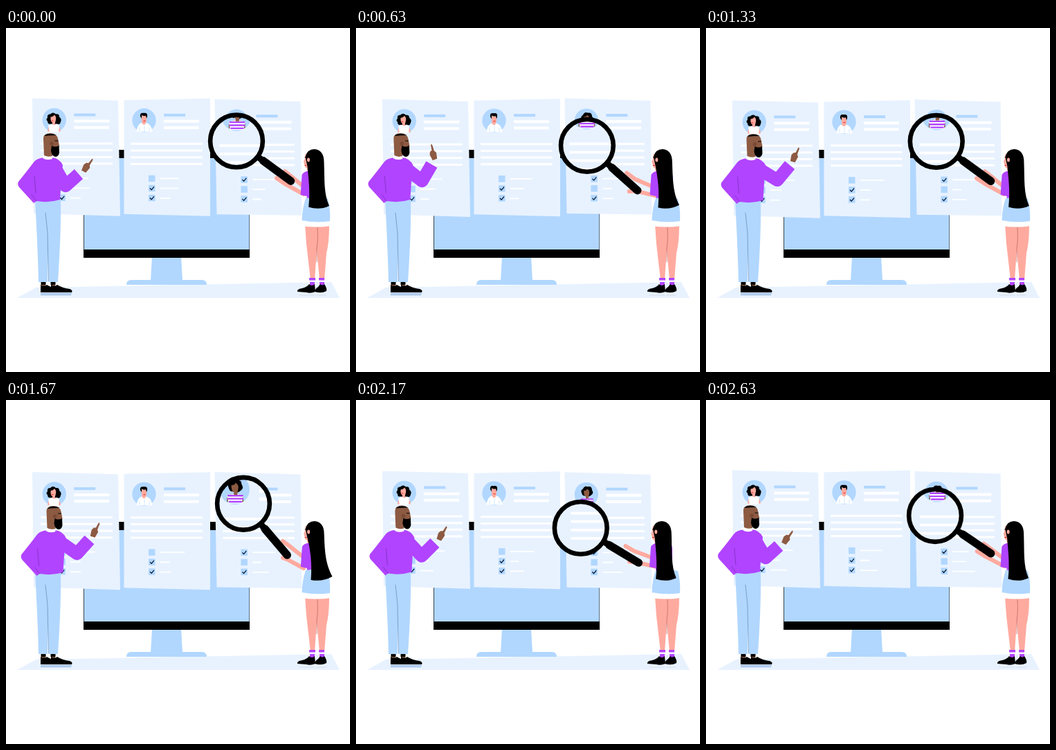
These frames come from a looping animation (497x497 px, 2670 ms). An HTML page without scripts:

```html
<!DOCTYPE html>
<html lang="en">
<head>
<meta charset="utf-8">
<title>Reviewing candidates</title>
<style>
html, body { margin: 0; width: 100%; height: 100%; overflow: hidden; background: #fff; }
svg { display: block; width: 100%; height: 100%; }

.pale { fill: #e8f2ff; }
.blue { fill: #b1d7ff; }
.purple { fill: #b144ff; }
.skin { fill: #ffaa9f; }
.brown { fill: #8d5a42; }
.white { fill: #fff; }
.line { fill: none; stroke-linecap: round; stroke-linejoin: round; }

/* --p is the time (ms) of the positive extreme, --d half a period */
.slow { --d: 1335ms; }
.fast { --d: 667.5ms; }
.sway, .tilt, .row, .hair {
  animation: sway var(--d) cubic-bezier(.364, 0, .636, 1) calc(var(--p) * 1ms - 3 * var(--d)) infinite alternate;
}
.sway { --x: 0px; --y: 0px; }
.tilt { animation-name: tilt; }
.row { animation-name: row; }
.hair { animation-name: hair; }
@keyframes sway {
  from { translate: calc(var(--x) * -1) calc(var(--y) * -1); }
  to { translate: var(--x) var(--y); }
}
@keyframes tilt { from { rotate: 26.3deg; } to { rotate: 49.7deg; } }
@keyframes row { from { width: 13px; } to { width: 36px; } }
@keyframes hair {
  from { d: path("M431 186Q434 175 444 175Q458 176 458 194C459 220 456 240 463 258Q449 264 434 258C437 235 434 216 434 200Z"); }
  to { d: path("M431 186Q434 175 444 175Q458 176 458 194C459 220 460 236 470 255Q456 263 439 260C441 235 438 216 434 200Z"); }
}

.lean, .sleeve, .hand { animation: lean 2670ms ease-in-out infinite; }
.sleeve { animation-name: sleeve; }
.hand { animation-name: hand; }
@keyframes lean {
  0%, 20%, 88%, 100% { translate: 0 0; }
  38%, 75% { translate: 4.5px 1px; }
}
@keyframes sleeve {
  0%, 9%, 100% { d: path("M71 202L86 228L105 211"); }
  23.6% { d: path("M71 202L95 221L109 197"); }
  38.6% { d: path("M71 202L99 217L117 194"); }
  62.5% { d: path("M71 202L98 221L116 201"); }
  73.8% { d: path("M71 202L97 222L116 202"); }
  88.8% { d: path("M71 202L88 228L107 210"); }
}
@keyframes hand {
  0%, 9%, 100% { translate: 114px 205px; rotate: 28deg; }
  23.6% { translate: 113px 187px; rotate: -21deg; }
  38.6% { translate: 122px 186px; rotate: 15deg; }
  62.5% { translate: 122px 194px; rotate: 18deg; }
  73.8% { translate: 122px 195px; rotate: 18deg; }
  88.8% { translate: 116px 203px; rotate: 27deg; }
}

.arms { animation: arms 1335ms linear infinite; }
@keyframes arms {
  0%, 100% { d: path("M403 207L413 215L432 231M391 217L403 225L430 240"); }
  25% { d: path("M400 204L411 212L432 229M400 228L408 231L430 243"); }
  50% { d: path("M390 210L402 219L432 231M394 237L404 236L432 242"); }
  75% { d: path("M389 212L401 217L432 228M396 230L406 233L432 239"); }
}
</style>
</head>
<body>
<svg viewBox="0 0 497 497" xmlns="http://www.w3.org/2000/svg">
<defs>
  <clipPath id="glass"><circle r="36"/></clipPath>
  <g id="tick">
    <rect class="blue" width="9.5" height="9.5"/>
    <path class="line" d="M2.3 5L4.2 7L7.6 2.8" stroke="#0a1a3a" stroke-width="1.3"/>
  </g>
  <rect id="box" class="blue" width="9.5" height="9.5"/>
  <g id="resume">
    <circle class="blue" cx="199.5" cy="134.5" r="17.2"/>
    <path class="blue" d="M228 125h31v4h-31z"/>
    <g class="white">
      <path d="M228 134h51v4h-51zM228 143.3h50.500v4h-50.500z"/>
      <path d="M180 167h103.500v3h-103.500zM180 176.700h103.500v3h-103.500zM180 186.400h103.500v3h-103.500zM180 196.100h103.500v3h-103.500z"/>
      <rect class="row slow" x="222.500" y="217.700" height="1.800" rx=".9" style="--p:calc(660 + var(--o))"/>
      <rect class="row slow" x="222.500" y="232" height="1.800" rx=".9" style="--p:calc(2180 + var(--o))"/>
      <rect class="row slow" x="222.500" y="246.300" height="1.800" rx=".9" style="--p:calc(1650 + var(--o))"/>
    </g>
  </g>
  <g id="shoe">
    <path d="M0 0Q5 3 9 0Q17 5 27 6Q32 8 30 11H0Z"/>
  </g>
</defs>

<path class="pale" d="M16 390L43 375L470 367L482 390Z"/>

<!-- monitor -->
<path class="blue" d="M211 330H253L255 365H209ZM174 371Q174 364 181 364H283Q290 364 290 371Z"/>
<path d="M112 176H352V332H112Z"/>
<path class="blue" d="M112.700 188H351.500V320H112.700Z"/>

<!-- resumes -->
<g class="sway slow" style="--y:1.5px;--p:1340;--o:40">
  <path class="pale" d="M38 103L162 106.300L165 273.200L40 269.500Z"/>
  <g transform="translate(-129.700 0)">
    <use href="#resume"/>
    <use href="#box" x="206" y="214"/><use href="#box" x="206" y="228"/><use href="#tick" x="206" y="242"/>
  </g>
  <path class="skin" d="M60 151Q61 141 67 140H71Q78 141 79 151Z"/>
  <path class="white" d="M63 152L61 142L67 140L70 142L73 140L77 142L76 152Z"/>
  <path d="M60 136Q57 134 60 131Q59 126 64 126Q68 122 72 126Q77 125 77 130Q81 133 79 137Q78 142 74 140H65Q60 141 60 136Z"/>
  <path class="skin" d="M64.500 130Q68 130 70 127Q73 130 72 134Q71 138 70.500 141H67V138Q64 137 64.500 130Z"/>
  <path class="line" d="M66 135.500h2" stroke="#d22" stroke-width="1"/>
</g>

<g class="sway slow" style="--y:1.4px;--p:1560;--o:0">
  <path class="pale" d="M170.500 105.500L295 103L295 273L170.500 270Z"/>
  <use href="#resume"/>
  <use href="#box" x="206" y="214"/><use href="#tick" x="206" y="228"/><use href="#tick" x="206" y="242"/>
  <path class="white" d="M188.500 151Q190 140 196 138H202Q210 140 211.500 151Z"/>
  <path class="line" d="M193 145v5M207 145v5M200 142v8" stroke="#b1d7ff" stroke-width=".6"/>
  <path class="skin" d="M195.500 128H203V135Q202 138 201.500 140L199 141L196.500 139Z"/>
  <path d="M194 129Q193 123 199 124Q205 123 204 129L203 132L202 128Q198 129 196 127V132Z"/>
  <path class="line" d="M199 135.500h2" stroke="#d22" stroke-width="1"/>
</g>

<g id="third" class="sway slow" style="--y:1.4px;--p:1950;--o:-320">
  <path class="pale" d="M301.500 103L425.500 106.500L427.500 271L304.500 269.500Z"/>
  <g transform="translate(133.400 .5)">
    <use href="#resume"/>
    <use href="#tick" x="206" y="214"/><use href="#box" x="206" y="228"/><use href="#tick" x="206" y="242"/>
  </g>
  <path class="brown" d="M324 149V144L329 140H338L343 144V149Z"/>
  <path class="white" d="M326 151L324 142L330 140H337L343 142L341 151Z"/>
  <path class="line" d="M325.500 142H342M325.500 145.500H342M327 149H340.500" stroke="#b144ff" stroke-width="1.900"/>
  <path d="M326 133Q324 129 328 127Q330 122 335 124Q341 123 341 129Q344 133 340 136Q336 140 332 137Q327 138 326 133Z"/>
  <path class="brown" d="M329 130Q333 130 334 127Q338 130 337 134Q336 138 336 141H332V138Q329 137 329 130Z"/>
</g>

<!-- man -->
<g>
  <path class="brown" d="M51 364H57V373H51ZM65 364H71V373H65Z"/>
  <path d="M50.500 367H57.500V371H50.500ZM64.500 367H71.500V371H64.500Z"/>
  <use href="#shoe" x="50" y="371"/>
  <use href="#shoe" x="65" y="371"/>
  <path d="M50 383.500H95M50 385.500H94" stroke="#7fa9da" stroke-width="1"/>
  <path class="blue" d="M42 249H79Q80 290 75 367H62L60 320L60 367H47Q46 320 42 249Z"/>
  <path class="line" d="M57 267L60 296L60.500 322L61.500 366" stroke="#6b91bd" stroke-width=".8"/>
  <g class="lean">
    <path class="purple" d="M54 187Q43 189 40 194Q31 206 18 222Q16 226 19 230L40 253L44 250Q62 253 78 248L80 216L82 198Q77 188 66 187Z"/>
    <path class="line" d="M41 214L43 238M44 250L37 241" stroke="#742bb0" stroke-width=".7"/>
    <path class="white" d="M53.500 184H67V189Q59 192 53 188Z"/>
    <path class="brown" d="M55 184L54 160Q54 152 64 152Q73 152 75 160L77 170L74 180L67 181V185Q60 187 55 184Z"/>
    <path d="M55 156Q62 150 73 155Q63 155 55 156ZM66 170Q71 173 76.500 170L77 180Q76 186 71 186Q66 185 65 177Z"/>
    <path class="line" d="M71 163h4" stroke="#000" stroke-width="1"/>
    <circle cx="66" cy="167" r="2.800" fill="#7a4a35"/>
    <path class="brown hand" d="M-4 3L-5-6L-3-10L0-11L1.500-19Q3-20 3.500-18L3-9L5-6L3 3Z"/>
    <path class="line sleeve" stroke="#b144ff" stroke-width="18.500" style="stroke-linecap:butt" d="M71 202L86 228L105 211"/>
  </g>
</g>

<!-- woman's arms -->
<path class="line arms" stroke="#ffaa9f" stroke-width="6" d="M403 207L413 215L432 231M391 217L403 225L430 240"/>

<!-- magnifier -->
<g class="sway fast" style="--x:10.500px;--p:325">
  <g class="sway fast" style="--y:-19.200px;--p:280">
    <g transform="translate(332.500 168.300)">
      <g clip-path="url(#glass)">
        <circle class="pale" r="37"/>
        <g class="sway fast" style="--x:-13.125px;--p:325">
          <g class="sway fast" style="--y:24px;--p:280">
            <use href="#third" transform="scale(1.25) translate(-332.500 -168.300)"/>
          </g>
        </g>
      </g>
      <circle r="37.900" fill="none" stroke="#000" stroke-width="6.600"/>
      <g class="tilt fast" style="--p:365">
        <path class="line" d="M40 0H60" stroke="#000" stroke-width="9"/>
        <path class="line" d="M48 0H97.500" stroke="#000" stroke-width="11.500"/>
      </g>
    </g>
  </g>
</g>

<!-- woman -->
<path class="skin" d="M432 284H450L449 320L446 364H440L434 312ZM448 284H467Q467 310 463 325L460 364H453L449 322Z"/>
<path class="line" d="M450 288Q451 306 449 318V338" stroke="#b5655f" stroke-width=".7"/>
<path class="white" d="M438 361H447V374H438ZM452 361H460V374H452Z"/>
<path class="purple" d="M438 361H447V364.500H438ZM452 361H460V364.500H452ZM439 367H446V372H439ZM453 367H460V372H453Z"/>
<path d="M421 381Q420 377 428 376Q435 374 438 370Q442 374 446 370L447 381Q440 384 434 382ZM446 381Q447 376 451 374L454 370Q457 373 460 370Q464 376 463 380Q456 384 446 381Z"/>
<path class="line" d="M424 386H446M449 386H462" stroke="#cfd6df" stroke-width=".7"/>
<path class="white" d="M428 278H468L469 286Q449 289 427 286Z"/>
<g class="sway fast" style="--x:1px;--p:200">
  <path class="purple" d="M434 207H452Q458 208 458 214V248H434V243L425 241L427 212Q429 208 434 207Z"/>
</g>
<path class="blue" d="M433 246Q450 243 465 247Q469 262 468 279Q448 282 427.500 278Q428 260 433 246Z"/>
<g class="sway fast" style="--x:2.200px;--p:180">
  <path class="skin" d="M431 182H440V207H434L433 202Q430 202 430 198L428.500 193L430 190Z"/>
  <path class="line" d="M430.500 198.500h2" stroke="#d22" stroke-width="1"/>
  <path class="line" d="M430.500 187h2.500" stroke="#000" stroke-width=".9"/>
  <path class="hair fast" style="--p:400" d="M431 186Q434 175 444 175Q458 176 458 194C459 220 460 236 470 255Q456 263 439 260C441 235 438 216 434 200Z"/>
  <ellipse class="skin" cx="435.500" cy="190.500" rx="2" ry="3"/>
</g>
</svg>
</body>
</html>
```
